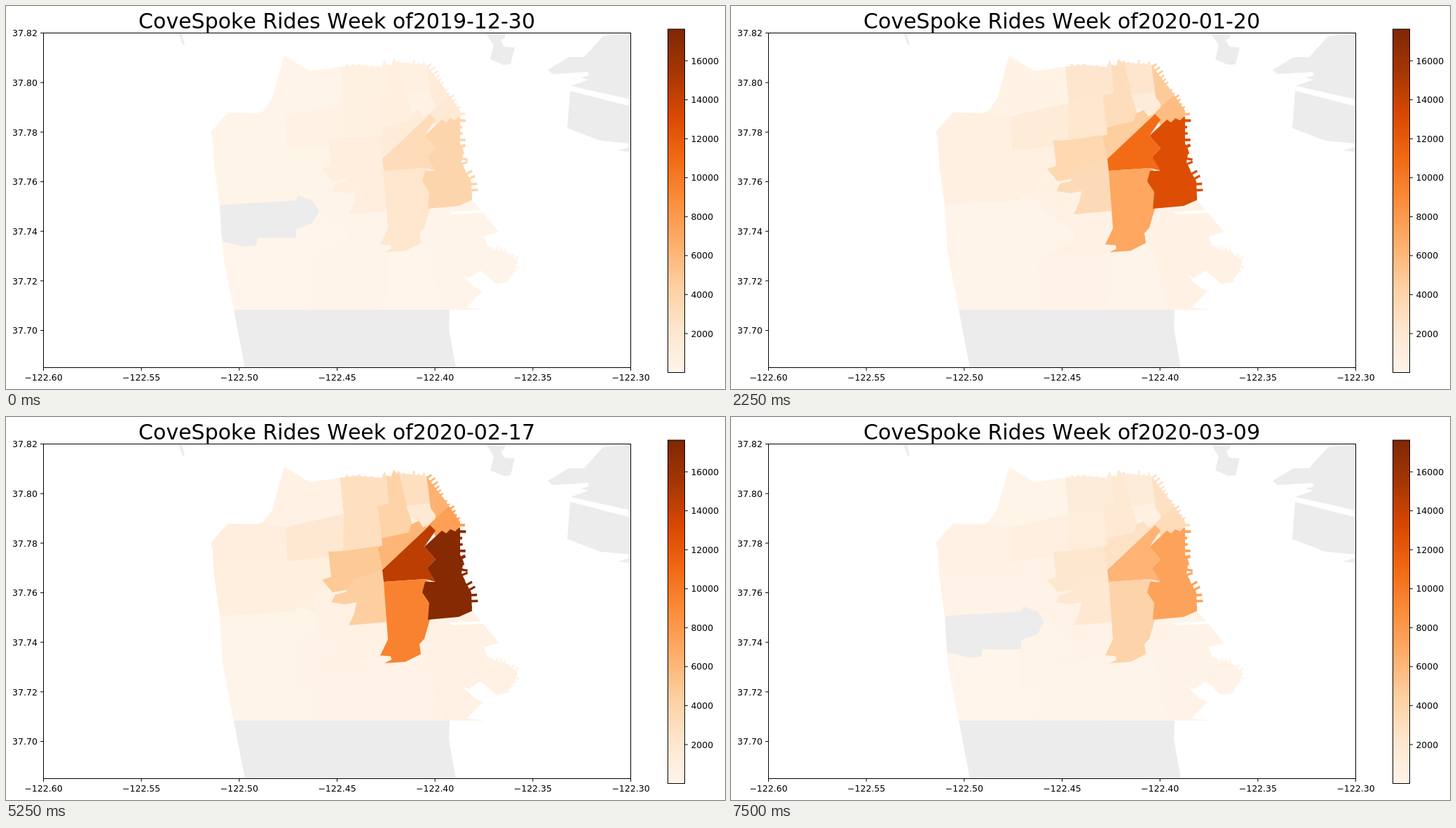
These frames come from a looping animation (1026x546 px, 8 s). An HTML page with a canvas:

```html
<!DOCTYPE html>
<html lang="en">
<head>
<meta charset="utf-8">
<title>Weekly rides</title>
<style>
html, body { margin: 0; width: 100%; height: 100%; overflow: hidden; background: #fff; }
canvas { display: block; }
</style>
</head>
<body>
<canvas id="stage" width="1026" height="546"></canvas>
<script>
const ctx = document.getElementById('stage').getContext('2d');
const LOOP = 8000, STEP = 750, MAX = 17625;
const AXES = { left: 53.5, top: 38.5, right: 891.5, bottom: 515.5 };
const BAR = { left: 944.5, top: 33, right: 968.5, bottom: 522.5 };
const NO_DATA = '#ececec';
const ORANGES = ['#fff5eb', '#fee6ce', '#fdd0a2', '#fdae6b', '#fd8d3c', '#f16913', '#d94801', '#a63603', '#7f2704'];

// Share of peak ridership as [week, level], linear in between.
const TREND = [[0, 0.22], [1, 0.55], [3, 0.73], [4, 0.91], [8, 1], [10, 0.42]];

const points = list => list.split(' ').map(p => p.split(',').map(Number));

function polygon(pts) {
  return new Path2D('M' + pts.join('L') + 'Z');
}

function randomFrom(seed) {
  return () => (seed = (seed * 16807) % 2147483647) / 2147483647;
}
const random = randomFrom(2020);

// Sets piers of random length on the seaward (left) side of a shoreline.
function piers(shore, reach, spacing) {
  return shore.slice(1).flatMap(([bx, by], s) => {
    const [ax, ay] = shore[s];
    const dx = bx - ax, dy = by - ay, length = Math.hypot(dx, dy);
    const count = Math.max(1, Math.round(length / spacing));
    const at = (t, out) => [ax + dx * t + dy / length * out, ay + dy * t - dx / length * out];
    const teeth = Array.from({ length: count }, (_, i) => {
      const out = reach * random(), from = (i + 0.25) / count, to = (i + 0.65) / count;
      return [at(from, 0), at(from, out), at(to, out), at(to, 0)];
    });
    return [[ax, ay], ...teeth.flat(), [bx, by]];
  });
}

const land = polygon([
  ...points('325,433 309,350 305,284 297,225 295,188 292,180 304,166 317,152 358,153 367,150 380,132 397,71 413,81 433,93'),
  ...piers(points('474,87 500,84 536,87'), 4, 9),
  ...points('540,77 543,84 550,85 553,75'),
  ...piers(points('557,80 600,84'), 8, 7),
  ...piers(points('600,84 612,100 626,118 647,148'), 8, 6),
  ...piers(points('648,150 648,196 653,206 650,222 656,236 664,250 665,276'), 9, 9),
  ...points('677,291 632,293 636,297 681,295 703,322 682,328 686,341'),
  ...piers(points('698,347 714,351 730,364 724,380 714,394'), 6, 6),
  ...points('700,396 686,384 677,377 660,388 649,381 667,400 680,406 657,430 684,433')
]);

const surroundings = [
  '246,39 251,39 255,55 252,55',
  '685,39 712,39 712,45 706,49 711,58 726,59 720,83 710,84 691,76 696,56',
  '891,39 852,43 825,73 803,73 773,91 780,97 830,94 832,99 820,102 831,105 806,114 891,133',
  '805,121 891,143 891,196 848,192 801,174',
  '873,206 891,201 891,208',
  '325,433 633,433 632,460 642,516 341,516'
].map(list => polygon(points(list)));

// Districts are cut by the coast; later ones cover earlier ones.
const district = (peak, list, gaps = []) => ({ peak, gaps, shape: polygon(points(list)) });
const districts = [
  district(250, '280,60 750,60 750,440 280,440'),
  // south
  district(620, '602,280 592,338 604,344 614,400 627,440 740,440 740,280'),
  district(380, '437,361 534,338 546,352 547,390 537,434 419,434 437,424'),
  district(120, '300,331 414,331 414,386 438,381 439,425 419,434 300,434', [1]),
  district(650, '437,256 466,228 545,240 546,318 534,341 437,361 490,335 490,324 447,292 434,267'),
  // west
  district(950, '285,206 463,192 466,228 437,256 434,267 440,276 414,277 306,284 285,285'),
  district(200, '300,284 414,277 417,270 437,277 447,292 437,310 414,318 414,331 359,331 357,342 340,343 309,336', [0, 10]),
  district(1000, '285,140 399,140 401,206 285,208'),
  district(2000, '399,156 485,136 482,191 462,192 461,199 401,206'),
  district(480, '367,148 376,155 399,157 482,138 474,60 380,60'),
  // north
  district(3000, '474,60 560,60 550,124 482,138'),
  district(2950, '482,138 530,127 537,183 481,191'),
  district(4250, '541,60 560,60 572,127 579,150 575,164 536,173 530,127 546,124'),
  district(3000, '556,60 597,60 603,104 606,123 572,127'),
  district(1800, '571,127 606,123 613,140 611,153 594,156 588,148 578,145'),
  district(6500, '597,60 660,60 660,110 631,128 612,152 613,140 606,130'),
  // centre
  district(6250, '536,173 575,164 578,153 589,148 595,157 605,154 537,218 530,185 537,183'),
  district(5000, '460,192 481,191 530,184 537,218 545,235 466,250 451,232 464,228'),
  district(4600, '496,232 538,218 546,292 489,297 497,280 500,264 484,267 464,264 470,253 484,250'),
  district(7800, '603,154 631,128 660,110 670,170 613,170'),
  district(14800, '537,218 605,154 613,162 597,185 613,203 601,215 613,231 613,235 598,231 539,235'),
  district(9700, '539,235 598,231 606,236 606,285 597,316 590,324 592,338 570,349 540,351 550,346 549,341 534,340 545,317'),
  district(17600, '597,185 622,162 628,166 634,160 641,163 646,158 680,170 680,270 646,285 602,289 604,265 594,250 598,235 613,235 601,215 613,203')
];

const mix = (a, b, t) => a + (b - a) * t;

function color(value) {
  const pos = value / MAX * (ORANGES.length - 1);
  const i = Math.min(ORANGES.length - 2, Math.floor(pos));
  const channel = (hex, k) => parseInt(hex.slice(2 * k + 1, 2 * k + 3), 16);
  return `rgb(${[0, 1, 2].map(k => Math.round(mix(channel(ORANGES[i], k), channel(ORANGES[i + 1], k), pos - i)))})`;
}

function level(week) {
  const next = Math.max(1, TREND.findIndex(([w]) => w >= week));
  const [w0, a] = TREND[next - 1], [w1, b] = TREND[next];
  return mix(a, b, (week - w0) / (w1 - w0));
}

function fill(shape, style) {
  ctx.fillStyle = style;
  ctx.fill(shape);
}

function text(label, x, y, align, size = 12.5) {
  ctx.font = `${size}px "DejaVu Sans", sans-serif`;
  ctx.fontKerning = 'none';
  ctx.textAlign = align;
  ctx.fillStyle = '#000';
  ctx.fillText(label, x, y);
}

function line(x1, y1, x2, y2) {
  ctx.beginPath();
  ctx.moveTo(x1, y1);
  ctx.lineTo(x2, y2);
  ctx.stroke();
}

function frame({ left, top, right, bottom }) {
  ctx.strokeRect(left, top, right - left, bottom - top);
}

function drawMap(week) {
  surroundings.forEach(shape => fill(shape, NO_DATA));
  ctx.save();
  ctx.clip(land);
  for (const { peak, gaps, shape } of districts) {
    fill(shape, gaps.includes(week) ? NO_DATA : color(peak * level(week)));
  }
  ctx.restore();
}

function drawAxes() {
  ctx.strokeStyle = '#000';
  ctx.lineWidth = 1;
  frame(AXES);
  for (let i = 0; i <= 6; i++) {
    const x = mix(AXES.left, AXES.right, i / 6);
    const y = mix(AXES.top, AXES.bottom, i * 0.02 / 0.135);
    line(x, AXES.bottom, x, AXES.bottom + 4.4);
    line(AXES.left, y, AXES.left - 4.4, y);
    text('\u2212' + (122.6 - i * 0.05).toFixed(2), x, 534.4, 'center');
    text((37.82 - i * 0.02).toFixed(2), 44.9, y + 4.8, 'right');
  }
}

function drawColorBar() {
  const ramp = ctx.createLinearGradient(0, BAR.bottom, 0, BAR.top);
  ORANGES.forEach((c, i) => ramp.addColorStop(i / (ORANGES.length - 1), c));
  ctx.fillStyle = ramp;
  ctx.fillRect(BAR.left, BAR.top, BAR.right - BAR.left, BAR.bottom - BAR.top);
  frame(BAR);
  for (let v = 2000; v <= 16000; v += 2000) {
    const y = mix(BAR.bottom, BAR.top, v / MAX);
    line(BAR.right, y, BAR.right + 4.4, y);
    text(v, 977.4, y + 4.6, 'left');
  }
}

function draw(week) {
  ctx.fillStyle = '#fff';
  ctx.fillRect(0, 0, 1026, 546);
  drawMap(week);
  drawAxes();
  drawColorBar();
  const date = new Date(Date.UTC(2019, 11, 30 + week * 7)).toISOString().slice(0, 10);
  text('CoveSpoke Rides Week of' + date, 755, 32, 'right', 30);
}

let shown = -1;
function tick() {
  const week = Math.floor(performance.now() % LOOP / STEP);
  if (week !== shown) draw(shown = week);
  requestAnimationFrame(tick);
}
tick();
</script>
</body>
</html>
```
